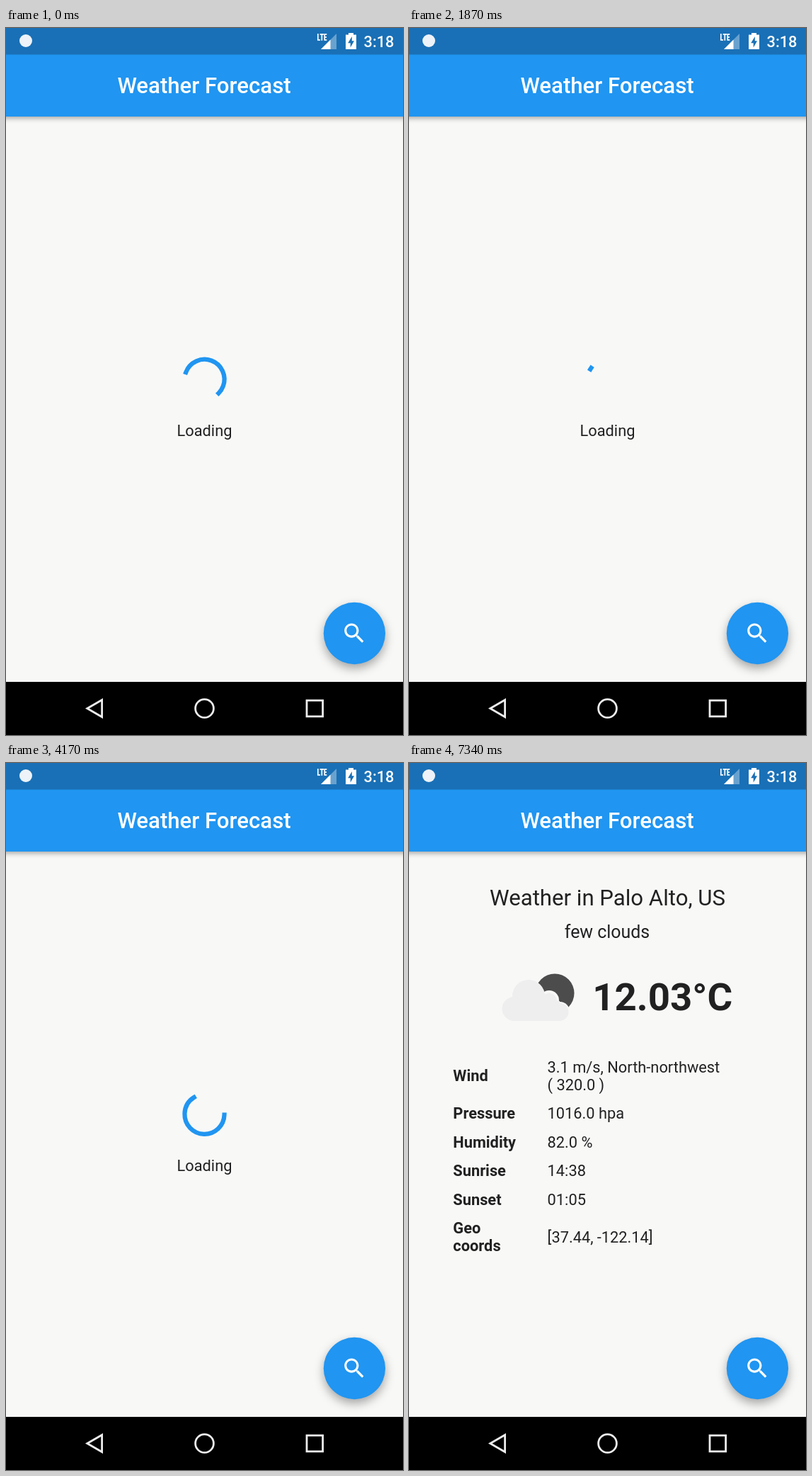
Write an HTML page with a canvas that moves like this. It is 561 px wide and 998 px high and loops after 8 s.

```html
<!DOCTYPE html>
<html lang="en">
<head>
<meta charset="utf-8">
<title>Weather Forecast</title>
<style>
  html, body { margin: 0; width: 100%; height: 100%; overflow: hidden; background: #f8f8f7; }
  canvas { display: block; }
</style>
</head>
<body>
<canvas id="stage" width="561" height="998"></canvas>
<script>
const W = 561, H = 998, DP = W / 360, LOOP = 8000, FPS = 24;
const BLUE = '#2095f1', PAGE = '#f8f8f7', BAR = '#1970b6', INK = '#212121';
const SPINNER_STOP = 4880, CONTENT_AT = 5090, ICON_AT = 6830, ICON_FADE = 510;
const ctx = document.getElementById('stage').getContext('2d');

function bezier(x1, y1, x2, y2) {
  const at = (a, b, s) => 3 * (1 - s) ** 2 * s * a + 3 * (1 - s) * s * s * b + s ** 3;
  return x => {
    if (x <= 0) return 0;
    if (x >= 1) return 1;
    let lo = 0, hi = 1;
    for (let i = 0; i < 24; i++) {
      const mid = (lo + hi) / 2;
      if (at(x1, x2, mid) < x) lo = mid; else hi = mid;
    }
    return at(y1, y2, lo);
  };
}
const fastOutSlowIn = bezier(0.4, 0, 0.2, 1);
const easeIn = bezier(0.42, 0, 1, 1);

// Spinner cycles completed over time (ms, cycles).
const pace = [[0, 1.243], [917, 2.094], [1875, 3.04], [2917, 4.074], [4167, 5.3], [4880, 6]];

function cyclesAt(t) {
  let i = 1;
  while (i < pace.length - 1 && t > pace[i][0]) i++;
  const [t0, c0] = pace[i - 1], [t1, c1] = pace[i];
  return c0 + (c1 - c0) * (t - t0) / (t1 - t0);
}

function text(str, x, y, size, { weight = 400, color = INK, align = 'left' } = {}) {
  ctx.font = `${weight} ${size}px Roboto, sans-serif`;
  ctx.fillStyle = color;
  ctx.textAlign = align;
  ctx.fillText(str, x, y);
}

function rect(x, y, w, h, color) {
  ctx.fillStyle = color;
  ctx.fillRect(x, y, w, h);
}

function disc(x, y, r, color, c = ctx) {
  c.fillStyle = color;
  c.beginPath();
  c.arc(x, y, r, 0, 2 * Math.PI);
  c.fill();
}

function fillPath(d, color) {
  ctx.fillStyle = color;
  ctx.fill(new Path2D(d));
}

function withShadow(alpha, blur, dy, draw) {
  ctx.save();
  ctx.shadowColor = `rgba(0,0,0,${alpha})`;
  ctx.shadowBlur = blur;
  ctx.shadowOffsetY = dy;
  draw();
  ctx.restore();
}

function drawStatusBar() {
  rect(0, 0, W, 37.5, BAR);
  disc(28, 18, 9, '#edf3f8');

  fillPath('M445 30L467 8V30Z', 'rgba(255,255,255,.35)');
  fillPath('M445 30L458.5 16.5V30Z', '#fff');
  ctx.strokeStyle = '#fff';
  ctx.lineWidth = 1.7;
  ctx.stroke(new Path2D('M440.8 8V16.9H444M443.6 8.9H449M446.3 8.9V17.8M453.3 8.9H450.2V16.9H453.3M450.2 12.9H453'));

  fillPath('M484 7H491V9.5H495V30H480V9.5H484Z', '#fff');
  fillPath('M488.8 12L483.2 21.2H486.7V27.5L492 18.3H488.8Z', BAR);
  text('3:18', 548.5, 27, 14 * DP, { weight: 500, color: '#fff', align: 'right' });
}

function drawAppBar() {
  withShadow(0.34, 7, 2.5, () => rect(-20, 0, W + 40, 125, BLUE));
  text('Weather Forecast', 280, 92, 20 * DP, { weight: 500, color: '#fff', align: 'center' });
}

function drawSearchButton() {
  withShadow(0.34, 14, 6, () => disc(492.4, 854.5, 28 * DP, BLUE));
  ctx.save();
  ctx.translate(492.2 - 12 * DP, 854.5 - 12 * DP);
  ctx.scale(DP, DP);
  fillPath('M15.5 14h-.79l-.28-.27C15.41 12.59 16 11.11 16 9.5 16 5.91 13.09 3 9.5 3S3 5.91 3 9.5 5.91 16 9.5 16c1.61 0 3.09-.59 4.23-1.57l.27.28v.79l5 4.99L20.49 19l-4.99-5zm-6 0C7.01 14 5 11.99 5 9.5S7.01 5 9.5 5 14 7.01 14 9.5 11.99 14 9.5 14z', '#fff');
  ctx.restore();
}

function drawNavBar() {
  rect(0, 923, W, H - 923, '#000');
  ctx.strokeStyle = '#ececec';
  ctx.lineWidth = 2.8;
  ctx.stroke(new Path2D('M114.8 960.5L135.6 948.5V972.5Z'));
  ctx.beginPath();
  ctx.arc(280.5, 960.5, 12.9, 0, 2 * Math.PI);
  ctx.stroke();
  ctx.strokeRect(425, 949.2, 22.6, 22.6);
}

function drawLoading(t) {
  const cycles = cyclesAt(Math.min(t, SPINNER_STOP));
  const step = Math.floor(cycles), u = cycles - step;
  const head = fastOutSlowIn(u * 2), tail = fastOutSlowIn(u * 2 - 1);
  const start = Math.PI * (-0.5 + 1.5 * tail + 1.7 * u - 0.8 * step);
  const sweep = Math.max(1.5 * Math.PI * (head - tail), 0.004);
  ctx.save();
  ctx.strokeStyle = BLUE;
  ctx.lineWidth = 4 * DP;
  ctx.lineCap = 'square';
  ctx.beginPath();
  ctx.arc(280.5, 495.8, 18 * DP, start, start + sweep);
  ctx.stroke();
  ctx.restore();
  text('Loading', W / 2, 575.5, 14 * DP, { align: 'center' });
}

function makeCloudIcon() {
  const icon = document.createElement('canvas');
  icon.width = 110;
  icon.height = 75;
  const c = icon.getContext('2d');
  c.translate(-128, -294);
  disc(206, 325, 27.5, '#484848', c);
  c.globalCompositeOperation = 'destination-out';
  [[168, 330, 24], [198, 335, 14], [213, 351, 14]].forEach(([x, y, r]) => disc(x, y, r, '#000', c));
  c.globalCompositeOperation = 'source-over';
  const light = '#eeeeee';
  [[169, 329, 23], [198, 336, 11], [213, 351.5, 12.5], [148.5, 347, 17]].forEach(([x, y, r]) => disc(x, y, r, light, c));
  c.fillRect(148.5, 336, 64.5, 28);
  return icon;
}
const cloudIcon = makeCloudIcon();

const details = [
  [['Wind', 449], ['3.1 m/s, North-northwest', 437], ['( 320.0 )', 462]],
  [['Pressure', 502], ['1016.0 hpa', 502]],
  [['Humidity', 543], ['82.0 %', 543]],
  [['Sunrise', 583], ['14:38', 583]],
  [['Sunset', 624], ['01:05', 624]],
  [['Geo', 664], ['[37.44, -122.14]', 677]],
  [['coords', 689]]
];

function drawWeather(t) {
  text('Weather in Palo Alto, US', W / 2, 201, 20 * DP, { align: 'center' });
  text('few clouds', 280, 247, 16 * DP, { align: 'center' });
  text('12.03°C', 358.2, 349, 35 * DP, { weight: 700, align: 'center' });
  for (const [[label, y], ...values] of details) {
    text(label, 40 * DP, y, 14 * DP, { weight: 700 });
    for (const [value, vy] of values) text(value, 195.6, vy, 14 * DP);
  }
  ctx.globalAlpha = easeIn((t - ICON_AT) / ICON_FADE);
  ctx.drawImage(cloudIcon, 128, 294);
  ctx.globalAlpha = 1;
}

function render(t) {
  rect(0, 0, W, H, PAGE);
  const tick = Math.floor((t + 6) * FPS / 1000) * 1000 / FPS;
  if (t < CONTENT_AT) drawLoading(tick); else drawWeather(tick);
  drawAppBar();
  drawStatusBar();
  drawSearchButton();
  drawNavBar();
}

const began = performance.now();
function loop() {
  render((performance.now() - began) % LOOP);
  requestAnimationFrame(loop);
}
loop();
</script>
</body>
</html>
```
